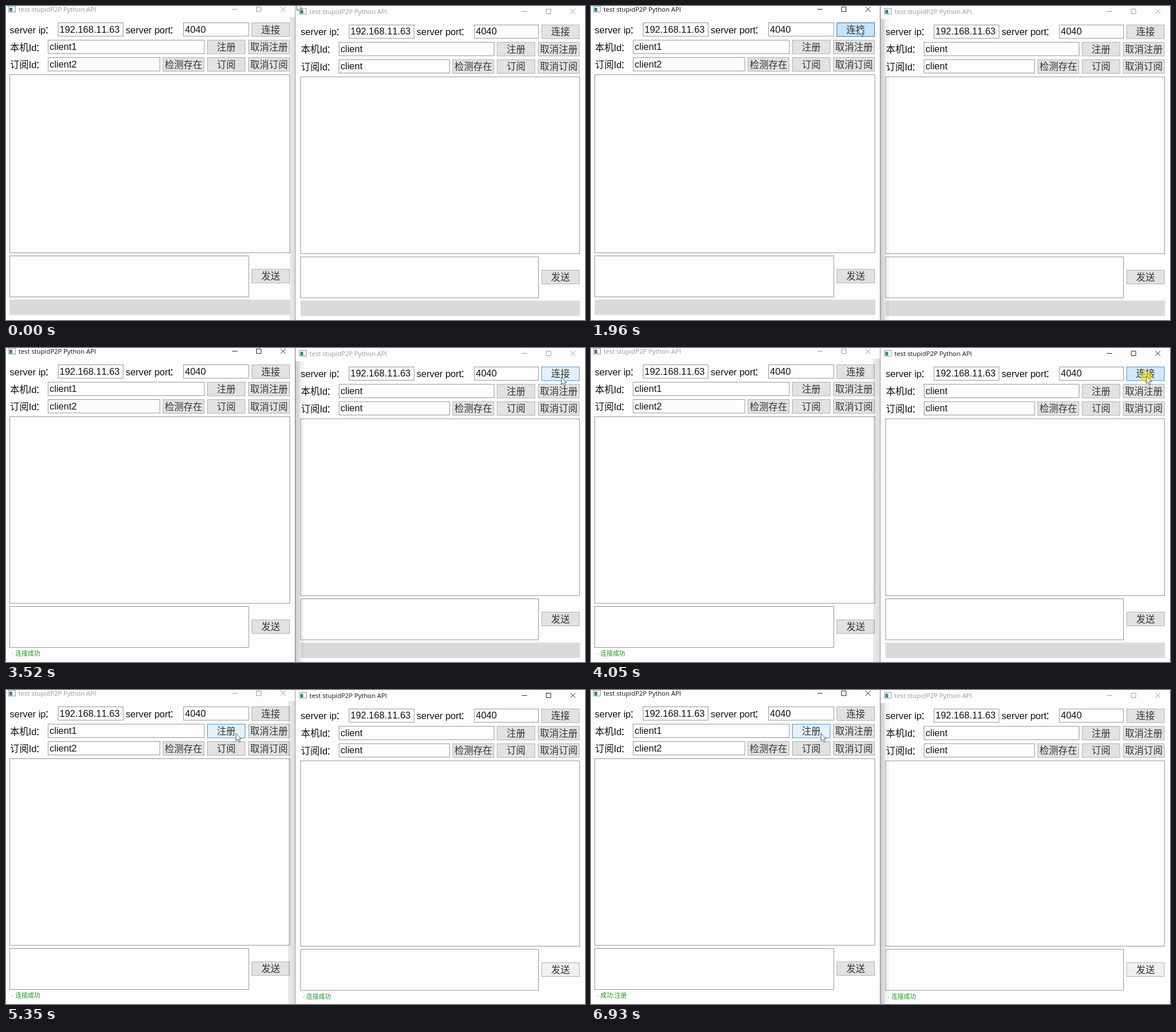
Write an HTML page that moves like this. It is 1016 px wide and 551 px high and loops after 8 s.

```html
<!DOCTYPE html>
<html lang="zh-CN">
<head>
<meta charset="utf-8">
<title>test stupidP2P Python API</title>
<style>
  html, body { margin: 0; width: 100%; height: 100%; overflow: hidden; background: #fdfdfd; }
  svg { display: block; width: 1016px; height: 551px; }
  text { font: 300 16.5px "Liberation Sans", "Noto Sans CJK SC Light", "Noto Sans CJK SC", "Noto Sans CJK", sans-serif; font-kerning: none; fill: #111; white-space: pre; }
  .btn text { text-anchor: middle; fill: #333; }
  .btn rect { fill: #e2e2e2; stroke: #b0b0b0; }
  .box { fill: #fdfdfd; stroke: #949494; }
  .bar { fill: #dadada; stroke: #e4e4e4; }
  .status { font-size: 10.8px; font-weight: 400; fill: #1c941c; }
  .title { font: 11.3px "Open Sans", "Noto Sans", sans-serif; fill: inherit; }
  .caption { fill: #999; stroke: #999; }
  .caption path { fill: none; }
  .caption text { stroke: none; }
  .caption.on { fill: #111; stroke: #222; }
  .btn.hover rect { fill: #e4f1fb; stroke: #3c94dc; }
  .btn.glow rect { fill: #d3e8f8; stroke: #3c94dc; }
  .btn.down rect { fill: #c9e2f6; stroke: #3473ad; }
  .btn.pale rect { fill: #f1f1f1; }
</style>
</head>
<body>
<svg viewBox="0 0 1016 551" id="stage"></svg>
<script>
const LOOP = 8000;
const GROW = 15;
const stage = document.getElementById('stage');

const rect = (cls, l, t, r, b, id = '') =>
  `<rect class="${cls}" id="${id}" x="${l}" y="${t}" width="${r - l}" height="${b - t}"/>`;
const label = (x, y, s) => `<text x="${x}" y="${y}">${s}</text>`;
const caption = (x, y, s) => label(x, y, s + '<tspan dx="-2">：</tspan>');
const field = (l, t, r, s) =>
  rect('box', l, t, r, t + 23.5) + label(l + 2.5, t + 17.2, s);
const button = (id, l, t, r, s) =>
  `<g class="btn" id="${id}">${rect('', l, t, r, t + 24)}${label((l + r) / 2, t + 18, s)}</g>`;

// dl / dr move the left- and right-anchored parts, dy the upper rows, low the lower part
function panel(k, dl, dr, dy, low, me, peer) {
  const [a, b, c] = [29.5, 60, 90.5].map(y => y + dy);
  return `
    <g class="caption" id="${k}cap">
      <rect x="${4.5 + dl}" y="${.5 + dy}" width="12" height="10" fill="#fff" stroke="#8b9496"/>
      <rect x="${6 + dl}" y="${3 + dy}" width="5" height="6.5" fill="#2f8580" stroke="none"/>
      <text class="title" x="${22 + dl}" y="${10 + dy}">test stupidP2P Python API</text>
      <path transform="translate(${dr} ${dy})" d="M397 5.8h9M439.5 1.8h8v8h-8zM482 1.5l8.5 8.5M490.5 1.5l-8.5 8.5"/>
    </g>
    ${caption(6.5 + dl, a + 18, 'server ip')}
    ${field(91.5 + dl, a, 205.5 + dl, '192.168.11.63')}
    ${caption(210 + dl, a + 18, 'server port')}
    ${field(311.5 + dl, a, 426 + dr, '4040')}
    ${button(k + 'conn', 431.5 + dr, a, 497.5 + dr, '连接')}
    ${caption(7 + dl, b + 18.5, '本机Id')}
    ${field(74 + dl, b, 348 + dr, me)}
    ${button(k + 'reg', 353.5 + dr, b, 419.5 + dr, '注册')}
    ${button(k + 'unreg', 425.5 + dr, b, 497.5 + dr, '取消注册')}
    ${caption(7 + dl, c + 18.5, '订阅Id')}
    ${field(74 + dl, c, 270 + dr, peer)}
    ${button(k + 'check', 275.5 + dr, c, 347.5 + dr, '检测存在')}
    ${button(k + 'sub', 353.5 + dr, c, 419.5 + dr, '订阅')}
    ${button(k + 'unsub', 425.5 + dr, c, 497.5 + dr, '取消订阅')}
    ${rect('box', 6.5 + dl, 120.5 + dy, 498 + dr, 433 + low, k + 'list')}
    <g id="${k}foot">
      ${rect('box', 6.5 + dl, 438.5 + low, 426 + dr, 510.5 + low)}
      ${button(k + 'send', 431.5 + dr, 462 + low, 497.5 + dr, '发送')}
    </g>
    ${rect('bar', 6.5 + dl, 515.5 + low, 498.5 + dr, 542 + low, k + 'bar')}
    <text class="status" id="${k}status" x="${10 + dl}" y="${540 + low}"></text>`;
}

stage.innerHTML = `
  <defs>
    <linearGradient id="fade">
      <stop offset="0" stop-opacity=".2"/><stop offset=".5" stop-opacity=".11"/>
      <stop offset=".55" stop-opacity=".05"/><stop offset="1" stop-opacity=".03"/>
    </linearGradient>
    <linearGradient id="rise">
      <stop offset="0" stop-opacity=".07"/><stop offset="1" stop-opacity=".13"/>
    </linearGradient>
  </defs>
  <rect width="1016" height="551" fill="#fdfdfd"/>
  ${panel('L', 0, 0, 0, 0, 'client1', 'client2')}
  ${panel('R', 510.5, 508.5, 3.7, 1.6, 'client', 'client')}
  <rect id="shadeL" y="19" height="532" fill="url(#rise)"/>
  <rect id="shadeR" x="508" y="23" width="15" height="528" fill="url(#fade)"/>
  <path id="edge" d="M507.5 0V551" stroke="#999"/>
  <circle id="click" r="10" fill="#f2e600" fill-opacity=".65"/>
  <path id="arrow" d="M.5 .5V13.2L3.4 10.6L5.7 15.8L7.9 14.8L5.6 9.8H9.7Z" fill="#fff" stroke="#555" stroke-width="1"/>`;

const $ = id => document.getElementById(id);
const listH = { L: +$('Llist').getAttribute('height'), R: +$('Rlist').getAttribute('height') };

// Each step changes only the named values
const steps = [
  [0, { pos: [510, -5], active: '', hot: '', look: '', L: '', R: '', click: false }],
  [920, { pos: [480, 4] }],
  [1050, { pos: [430, 12] }],
  [1180, { pos: [391, 21] }],
  [1310, { pos: [408, 29] }],
  [1440, { pos: [442, 36], hot: 'Lconn', look: 'hover' }],
  [1570, { pos: [470, 37] }],
  [1830, { active: 'L', look: 'glow', click: true }],
  [1960, { look: 'down', click: false }],
  [2090, { look: 'hover' }],
  [2220, { L: '连接成功' }],
  [2480, { pos: [560, 36], hot: '' }],
  [2610, { pos: [700, 32] }],
  [2740, { pos: [812, 30] }],
  [2870, { pos: [872, 40] }],
  [3000, { pos: [920, 50] }],
  [3130, { pos: [952, 57] }],
  [3260, { pos: [973, 58] }],
  [3390, { pos: [974, 55], hot: 'Rconn', look: 'hover' }],
  [3520, { pos: [974, 51] }],
  [3650, { pos: [974, 49] }],
  [4050, { active: 'R', look: 'glow', click: true }],
  [4180, { look: 'down', click: false }],
  [4310, { look: 'hover' }],
  [4440, { R: '连接成功' }],
  [4700, { pos: [930, 66], hot: '' }],
  [4830, { pos: [810, 86] }],
  [4960, { pos: [660, 98] }],
  [5090, { pos: [528, 97] }],
  [5220, { pos: [436, 86] }],
  [5350, { pos: [403, 76], hot: 'Lreg', look: 'hover' }],
  [6540, { active: 'L', look: 'glow', click: true }],
  [6670, { look: 'down', click: false }],
  [6800, { look: 'hover' }],
  [6930, { L: '成功:注册' }],
];

const stateAt = t => Object.assign({}, ...steps.filter(s => s[0] <= t).map(s => s[1]));
const show = (id, on) => { $(id).style.display = on ? '' : 'none'; };

function draw(s) {
  for (const k of ['L', 'R']) {
    const grow = s[k] ? GROW : 0;
    $(k + 'cap').classList.toggle('on', s.active === k);
    $(k + 'list').setAttribute('height', listH[k] + grow);
    $(k + 'foot').setAttribute('transform', `translate(0 ${grow})`);
    $(k + 'status').textContent = s[k] && '· ' + s[k];
    show(k + 'bar', !s[k]);
  }
  $('Rsend').classList.toggle('pale', !!s.R);
  for (const id of ['Lconn', 'Rconn', 'Lreg'])
    $(id).setAttribute('class', 'btn ' + (s.hot === id ? s.look : ''));

  const left = s.active === 'R' ? 495 : 498;
  $('shadeL').setAttribute('x', left);
  $('shadeL').setAttribute('width', 507 - left);
  show('shadeL', s.active !== 'L');
  show('shadeR', s.active === 'L');
  $('edge').setAttribute('stroke', s.active === 'L' ? '#777' : '#999');

  const [x, y] = s.pos;
  $('arrow').setAttribute('transform', `translate(${x} ${y})`);
  $('click').setAttribute('transform', `translate(${x + 1} ${y + 2})`);
  show('click', s.click);
}

const start = performance.now();
let last = -1;
function tick() {
  const t = (performance.now() - start) % LOOP;
  const n = steps.filter(s => s[0] <= t).length;
  if (n !== last) draw(stateAt(t));
  last = n;
  requestAnimationFrame(tick);
}
tick();
</script>
</body>
</html>
```
